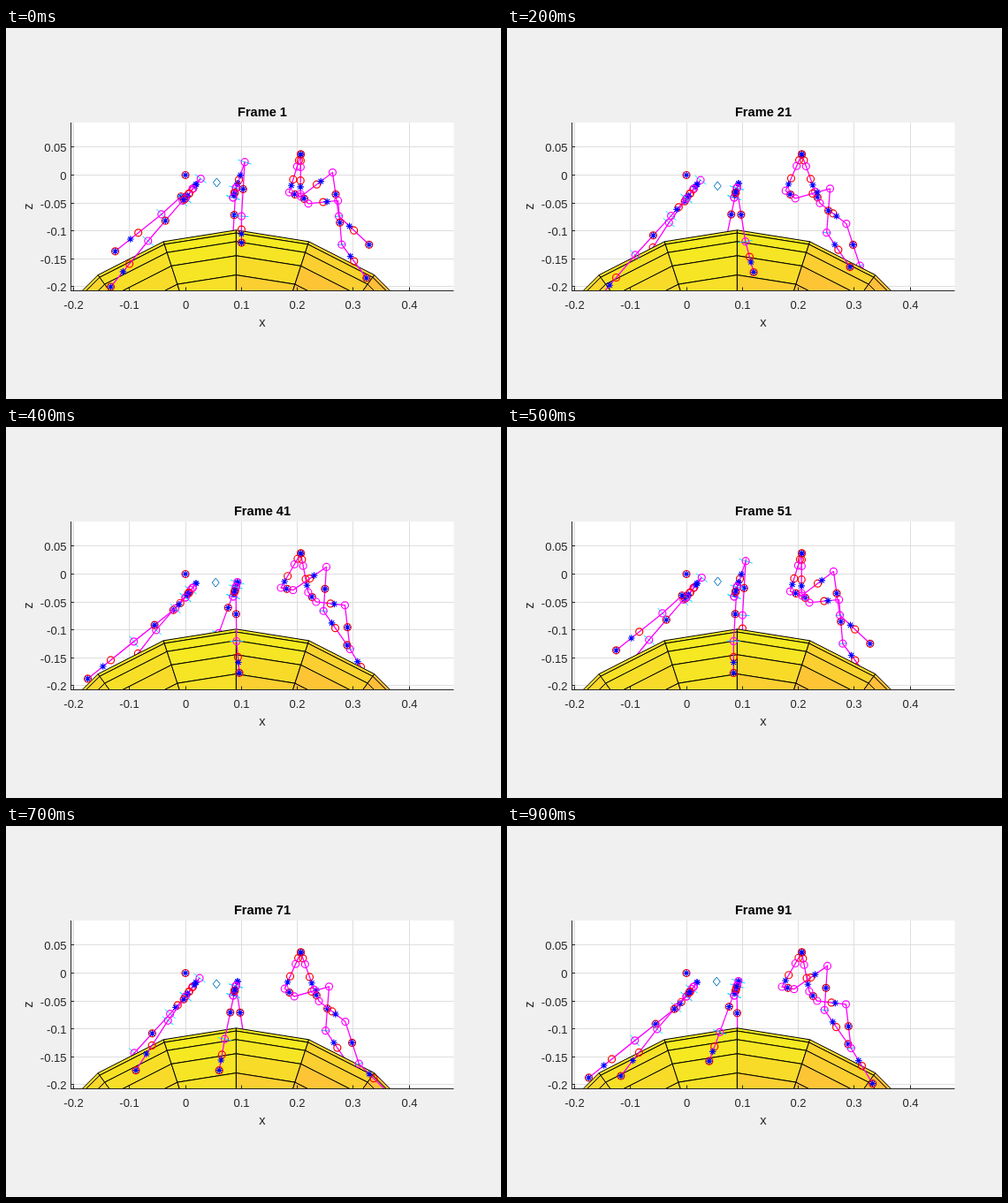
Write an HTML page with a canvas that moves like this. It is 560 px wide and 420 px high and loops after 1 s.

```html
<!DOCTYPE html>
<html lang="en">
<head>
<meta charset="utf-8">
<title>Walking gait plot</title>
<style>
  html, body { margin: 0; width: 100%; height: 100%; overflow: hidden; background: #f0f0f0; }
  canvas { display: block; width: 560px; height: 420px; }
</style>
</head>
<body>
<canvas id="plot" width="560" height="420"></canvas>
<script>
const ctx = document.getElementById('plot').getContext('2d');
const FONT = '"Liberation Sans", Arial, sans-serif';
const BOX = { left: 73, top: 107, right: 506.5, bottom: 297.5 };
const STEPS = 10, STEP_MS = 100, TAU = Math.PI * 2;
const RED = '#ff0000', MAGENTA = '#ff00ff', BLUE = '#0000ff', CYAN = '#00e5ff', INK = '#262626';

const rad = deg => deg * Math.PI / 180;
const mix = (a, b, k) => a.map((v, i) => v + (b[i] - v) * k);
const polar = (p, length, deg) => [p[0] + length * Math.cos(rad(deg)), p[1] + length * Math.sin(rad(deg))];

// Mean followed by cosine and sine amplitudes of each harmonic of the gait cycle.
function wave(phase, mean, ...amps) {
  return amps.reduce((sum, amp, i) => {
    const a = phase * (1 + (i >> 1));
    return sum + amp * (i % 2 ? Math.sin(a) : Math.cos(a));
  }, mean);
}

// Even backward sweep from 1 to -1 on the ground, then a quick return.
function stride(step) {
  return step === 0 ? 0 : 1 - (step - 1) / 4;
}

// Joints from a start point along [length, angle] segments.
function chain(start, ...segments) {
  const points = [start];
  for (const [length, deg] of segments) points.push(polar(points[points.length - 1], length, deg));
  return points;
}

function leftLeg(step, phase) {
  const root = [215, 177];
  const slide = wave(phase, 17.5, 10.3, 30.6, -9.7, -9.2, 5.8, 2.3);
  return [root, [203, 193], ...chain(
    polar(root, slide, 129.5),
    [60, wave(phase, 132.6, -3.6, 4.2, 1.6, -3.1)],
    [67, wave(phase, 131.1, -3.5, 4.3, 4.1, -2.1, -2.6, 2.3)]
  )];
}

function middleLeg(step, phase) {
  const lift = Math.max(0, Math.cos(phase)) ** 8, s = stride(step);
  return [[262, 176], [257, 192], ...chain(
    polar([260, 181], 31 * lift, -71),
    [61.5, 93.4 - 16.7 * s],
    [36 - 6 * lift, 90 - 20 * s]
  )];
}

function rightLeg(step, phase) {
  return chain(
    [333.5, 143],
    [45, wave(phase, 96, -5, 23.9, 2.7, -2.9, -3.2, 3.4)],
    [14, wave(phase, 42, 9.6, -16, -6.9, 9.7, 5.8, -4.6)],
    [wave(phase, 39.4, -5.6, 3.4), wave(phase, -4.4, 7.3, -25.2, -12.5, 10.4, 8.4, -2.8, -4.6, -0.7)],
    [50, wave(phase, 84.8, 1.7, 11.2, -1.3, -4.4)],
    [47, wave(phase, 51.6, 5.1, 4.2, -3.2, -6.7)]
  );
}

const legs = [
  { pose: leftLeg, mass: 0.67 },
  { pose: middleLeg, mass: 0.67 },
  { pose: rightLeg, mass: 0.35, long: true }
];

function trace(points, closed) {
  ctx.beginPath();
  points.forEach(p => ctx.lineTo(p[0], p[1]));
  if (closed) ctx.closePath();
}

function line(x1, y1, x2, y2, colour) {
  ctx.strokeStyle = colour;
  ctx.lineWidth = 1;
  trace([[x1, y1], [x2, y2]]);
  ctx.stroke();
}

function ring(p, colour) {
  ctx.strokeStyle = colour;
  ctx.lineWidth = 1.2;
  ctx.beginPath();
  ctx.arc(p[0], p[1], 4, 0, TAU);
  ctx.stroke();
}

function star(p) {
  ctx.strokeStyle = BLUE;
  ctx.lineWidth = 1.1;
  ctx.beginPath();
  for (let i = 0; i < 4; i++) {
    const a = polar(p, 3.8, i * 45), b = polar(p, -3.8, i * 45);
    ctx.moveTo(a[0], a[1]);
    ctx.lineTo(b[0], b[1]);
  }
  ctx.stroke();
}

// Short bar across the end of segment a-b.
function tick(a, b, size) {
  const deg = Math.atan2(b[1] - a[1], b[0] - a[0]) * 180 / Math.PI + 90;
  line(...polar(b, size, deg), ...polar(b, -size, deg), CYAN);
}

function drawLeg(leg, step) {
  const p = leg.pose(step, step / STEPS * TAU);
  const [thigh, knee, shin, tip] = p.slice(-4);

  if (leg.long) tick(knee, shin, 5);
  else [[p[0], thigh], [thigh, knee], [knee, shin]].forEach(s => tick(...s, 8));

  ctx.strokeStyle = MAGENTA;
  ctx.lineWidth = 1.3;
  trace(p);
  ctx.stroke();

  const hip = k => mix(p[0], p[1], k);
  if (leg.long) {
    ring(p[0], RED);
    ring(hip(0.16), RED);
    ring(mix(p[1], p[2], 0.5), RED);
    star(mix(p[1], p[2], 0.45));
  }
  star(p[0]);
  ring(hip(0.32), MAGENTA);
  ring(hip(0.66), RED);
  star(hip(0.82));

  p.slice(1, -1).forEach(q => ring(q, MAGENTA));
  ring(mix(thigh, knee, 0.5), RED);
  star(mix(thigh, knee, 0.63));
  ring(mix(knee, shin, 0.5), RED);
  star(mix(knee, shin, 0.5));
  ring(mix(shin, tip, 0.5), RED);
  star(mix(shin, tip, leg.mass));
  ring(tip, RED);
  star(tip);
}

// Sphere seen from the side: meridians every 18 degrees, rows every 9.
function spherePoint(col, row) {
  return polar([260.4, 494.8], 266 * Math.cos(rad(row * 9)), col * 18 - 90);
}

function drawDome() {
  ctx.strokeStyle = '#000';
  ctx.lineWidth = 1;
  ctx.lineJoin = 'round';
  for (let col = -3; col < 3; col++) {
    const side = col < 0 ? -col - 1 : col;
    for (let row = 0; row < 5; row++) {
      const heat = col < 0 ? row * row * 0.016 + side * 0.22 : row * row * 0.04 + side * 0.5;
      const rgb = mix([245, 236, 32], [254, 190, 58], Math.min(1, heat));
      trace([spherePoint(col, row), spherePoint(col + 1, row),
        spherePoint(col + 1, row + 1), spherePoint(col, row + 1)], true);
      ctx.fillStyle = `rgb(${rgb.map(Math.round)})`;
      ctx.fill();
      ctx.stroke();
    }
  }
}

function drawBody(phase) {
  const x = 238 + 1.1 * Math.cos(2 * phase - rad(65));
  const y = 177 + 2.1 * Math.cos(2 * phase - rad(173));
  ctx.strokeStyle = '#0072bd';
  ctx.lineWidth = 1;
  trace([[x, y - 5], [x + 4, y], [x, y + 5], [x - 4, y]], true);
  ctx.stroke();
  ring([203, 166.5], RED);
  star([203, 166.5]);
}

function text(str, x, y, font, align, colour = INK) {
  ctx.font = font + ' ' + FONT;
  ctx.textAlign = align;
  ctx.fillStyle = colour;
  ctx.fillText(str, x, y);
}

const tickX = i => Math.floor(203 + i * 63.3) + 0.5;
const tickY = i => Math.floor(166.4 - i * 31.6) + 0.5;

function drawGrid() {
  ctx.fillStyle = '#fff';
  ctx.fillRect(BOX.left, BOX.top, BOX.right - BOX.left, BOX.bottom - BOX.top);
  for (let i = -2; i <= 4; i++) line(tickX(i), BOX.top, tickX(i), BOX.bottom, '#dedede');
  for (let i = -4; i <= 1; i++) line(BOX.left, tickY(i), BOX.right, tickY(i), '#dedede');
}

function drawAxes() {
  line(73.5, BOX.top, 73.5, BOX.bottom, INK);
  line(73, BOX.bottom, BOX.right, BOX.bottom, INK);
  for (let i = -2; i <= 4; i++) {
    line(tickX(i), BOX.bottom, tickX(i), BOX.bottom - 4, INK);
    text(String(i / 10), tickX(i), 318, '13px', 'center');
  }
  for (let i = -4; i <= 1; i++) {
    line(73, tickY(i), 77, tickY(i), INK);
    text(String(i * 5 / 100), 68.5, tickY(i) + 5, '13px', 'right');
  }
  text('x', 290, 337.5, '14.6px', 'center');
  ctx.save();
  ctx.translate(30, 202);
  ctx.rotate(-Math.PI / 2);
  text('z', 0, 0, '14.6px', 'center');
  ctx.restore();
}

function draw(step) {
  ctx.fillStyle = '#f0f0f0';
  ctx.fillRect(0, 0, 560, 420);
  drawGrid();

  ctx.save();
  ctx.beginPath();
  ctx.rect(BOX.left, BOX.top, BOX.right - BOX.left, BOX.bottom - BOX.top);
  ctx.clip();
  // The legs behind the dome walk half a cycle apart from those in front.
  legs.forEach(leg => drawLeg(leg, (step + STEPS / 2) % STEPS));
  drawDome();
  legs.forEach(leg => drawLeg(leg, step));
  drawBody(step / STEPS * TAU);
  ctx.restore();

  drawAxes();
  text('Frame ' + (step * 10 + 1), 290, 100, 'bold 14.6px', 'center', '#000');
}

const start = performance.now();
let shown = -1;

function play(now) {
  const step = Math.floor(Math.max(0, now - start) / STEP_MS) % STEPS;
  if (step !== shown) draw(shown = step);
  requestAnimationFrame(play);
}

draw(shown = 0);
requestAnimationFrame(play);
</script>
</body>
</html>
```
